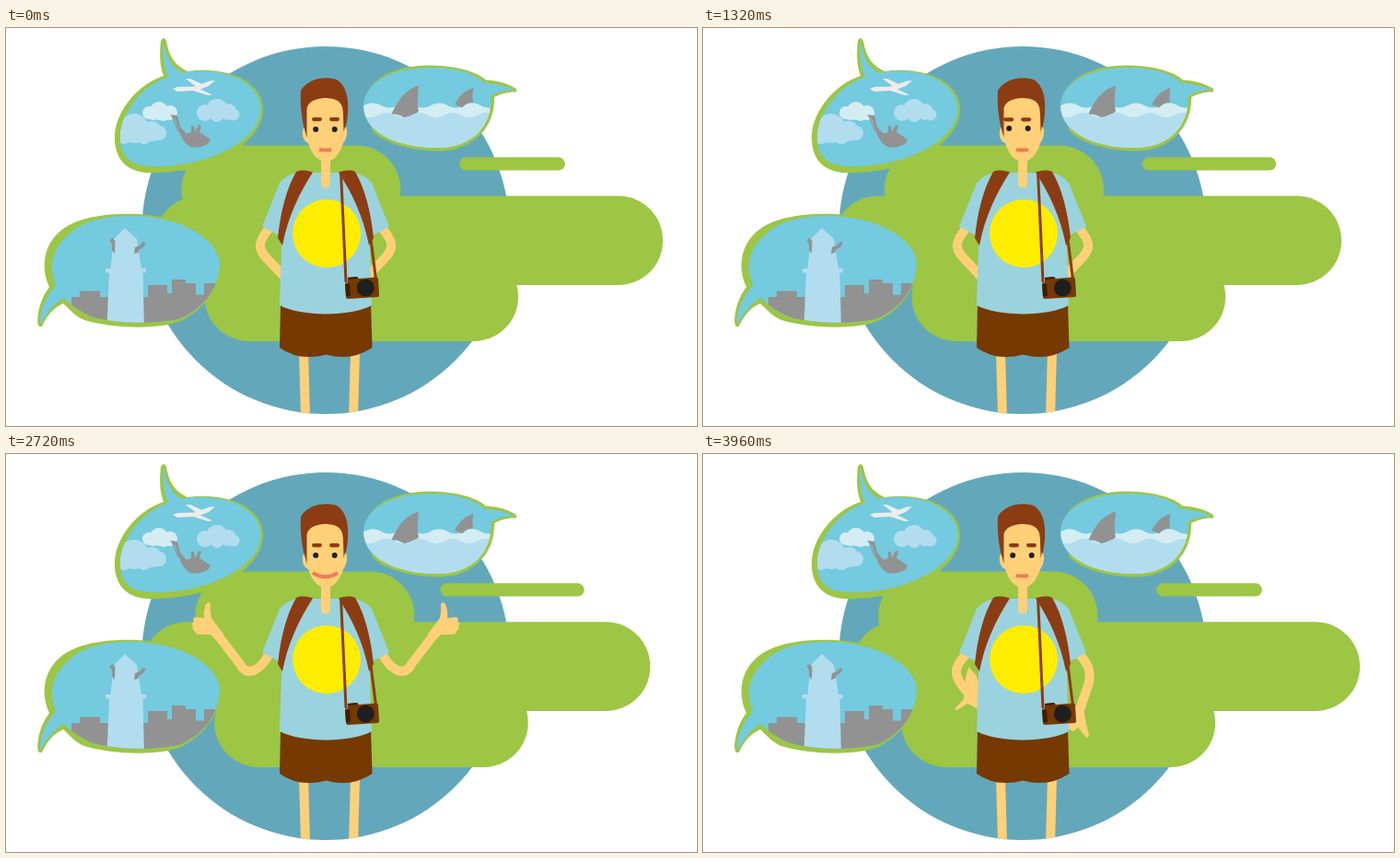
Animation, 750 px wide and 432 px high, one loop 4000 ms. Source, as an HTML page with a canvas:

```html
<!DOCTYPE html>
<html lang="en">
<head>
<meta charset="utf-8">
<title>Traveller</title>
<style>
html, body { margin: 0; width: 100%; height: 100%; overflow: hidden; background: #fff; }
canvas { display: block; width: 750px; height: 432px; }
</style>
</head>
<body>
<canvas id="stage"></canvas>
<script>
const LOOP = 4000, STEP = 40, W = 750, H = 432;
const canvas = document.getElementById('stage');
const ctx = canvas.getContext('2d');
const ratio = window.devicePixelRatio || 1;
canvas.width = W * ratio;
canvas.height = H * ratio;

const C = {
  disc: '#63a8ba', green: '#9cc644', sky: '#74cadf', light: '#b2ddef', pale: '#d3edf3',
  gray: '#929292', plane: '#ececec', skin: '#ffd077', hair: '#8c3c12', shorts: '#763900',
  shirt: '#9ad3de', sun: '#ffed00', dark: '#3e1e08', black: '#1f1f1f', lips: '#ee7b58'
};

const ease = x => (1 - Math.cos(Math.PI * x)) / 2;

// Rises from 0 to 1 at the peak time, then returns by the end of the loop.
const sway = (t, peak) => t < peak ? ease(t / peak) : 1 - ease((t - peak) / (LOOP - peak));

// Eased interpolation between rows of [time, values].
function track(t, rows) {
  let i = 0;
  while (i < rows.length - 2 && t >= rows[i + 1][0]) i++;
  const [t0, a] = rows[i], [t1, b] = rows[i + 1];
  const k = ease(Math.min(1, Math.max(0, (t - t0) / (t1 - t0))));
  return a.map((v, n) => v + (b[n] - v) * k);
}

function fill(shape, color) {
  ctx.fillStyle = color;
  ctx.fill(typeof shape === 'string' ? new Path2D(shape) : shape);
}

function stroke(d, color, width, cap = 'butt') {
  ctx.strokeStyle = color;
  ctx.lineWidth = width;
  ctx.lineCap = cap;
  ctx.lineJoin = 'round';
  ctx.stroke(new Path2D(d));
}

function circle(x, y, r, color) {
  ctx.beginPath();
  ctx.arc(x, y, r, 0, 7);
  ctx.fillStyle = color;
  ctx.fill();
}

function pill(x0, x1, y0, y1, color) {
  ctx.beginPath();
  ctx.roundRect(x0, y0, x1 - x0, y1 - y0, (y1 - y0) / 2);
  ctx.fillStyle = color;
  ctx.fill();
}

function inside(d, draw) {
  ctx.save();
  ctx.clip(new Path2D(d));
  draw();
  ctx.restore();
}

function bubble(rim, body, draw) {
  fill(rim, C.green);
  fill(body, C.sky);
  inside(body, draw);
}

function mirrored(draw) {
  ctx.save();
  ctx.translate(694, 0);
  ctx.scale(-1, 1);
  draw();
  ctx.restore();
}

function backdrop(t) {
  circle(347, 219.5, 199.5, C.disc);
  const a = 15.2 * sway(t, 2880), b = 23 * sway(t, 1720);
  const c = 15 * sway(t, 2000), d = 24.5 * sway(t, 2280);
  pill(190.3 + a, 428.3 + a, 127.5, 223.5, C.green);
  pill(161.5 - b, 713 - b, 182.3, 279, C.green);
  pill(215.5 + c, 556 + c, 243.5, 340, C.green);
  pill(492 - d, 606.8 + d, 140.3, 154.5, C.green);
}

function skydive() {
  const puffs = (list, color) => list.forEach(p => circle(...p, color));
  puffs([[139, 109, 16], [158, 112, 11], [166, 114, 8], [128, 118, 8], [150, 118, 8]], C.light);
  puffs([[166, 90, 10], [155, 92, 7], [178, 92, 8], [160, 94, 6], [171, 95, 6]], C.pale);
  puffs([[229, 88.5, 11.5], [216, 92, 9], [241, 91, 9], [247, 94, 6.5], [229, 95, 7]], C.light);
  fill('M181,66 L186,64 L204,63.5 L221,57.5 L227,57 L220,63 L211,66.5 L224,72.5 L219,73 L203,68 L186,69Z' +
    'M195,55 L200,55 L213,61 L206,63.5Z', C.plane);
  fill('M178,94 L186,95 L189,107 L196,115 L201,113 L201,106 L204,106 L205,113 L209,105 L212,106' +
    ' L210,113 L222,121 L220,125 Q211,131 200,129 Q191,124 187,110 L184,100Z', C.gray);
  stroke('M180,95 L187,112 M183,95 L190,113', C.gray, 1.2);
}

function wave(base, amp, phase, color) {
  const p = new Path2D();
  p.moveTo(385, 140);
  for (let x = 385; x <= 535; x += 2) p.lineTo(x, base + amp * Math.sin((x - phase) / 36 * 2 * Math.PI));
  p.lineTo(535, 140);
  fill(p, color);
}

function sharks() {
  wave(84, 2.6, 407, C.pale);
  fill('M418,94 C425,80 431,68 448,62.5 C447,73 446,82 448,90 Q443,97 432,97 Q424,92 418,94Z', C.gray);
  fill('M487,83 C492,74 497,68 507.5,65 C506,71 506,75 507,81 Q501,80 495,86.5 Q491,84 487,83Z', C.gray);
  wave(94.5, 2.6, 422, C.light);
}

function city() {
  fill('M71,330 V292 H80 V285.5 H102 V292 H154 V279 H175 V288 H180 V273 H195 V277 H206 V289.5 H215 V277 H240 V330Z', C.gray);
  fill('M109.5,325 L112,265.5 H108 V261 H113.5 L117,229 L129,217 L142,229 L147,261 H152 V265.5 H148.5 L150,325Z', C.light);
  fill('M112.5,230 L116,228 L118.5,231 L118,245 L115,241 L115,235Z', C.gray);
  fill('M139,245 L140,238 L145,236 L149,232 L152,233 L149,238 L145,240 L143,244Z', C.gray);
}

function bubbles() {
  bubble(
    'M168,14 Q171,8 174,14 C177,32 184,41 197,47 C240,41 279,58 279,88 C279,118 240,145 205,152' +
    ' C190,155 170,158 152,157 C127,155 117,138 118,116 C120,88 145,60 171,52 C166,38 167,25 168,14Z',
    'M171,14 C174,32 180,43 191,48.5 C237,41 276.5,59 276.5,88 C276,118 236,138 206,145' +
    ' C190,149 170,151 155,150 C133,149 123,137 124,116 C126,90 148,62 176,53 C170,40 170,25 171,14Z',
    skydive);
  bubble(
    'M389,80 C394,55 420,41 460,40.5 C490,41 510,47 521,56.5 C535,57 546,61 554,66 L554,69.5' +
    ' C544,69 536,72 530,75 C531,108 507,133 470,133.5 C440,133 412,126 398,112Z',
    'M388,85 C388,60 418,43 460,43 C490,43 510,50 519,59.5 C532,60 544,64 553,67.5' +
    ' C541,67 532,70 526.5,74 C528,107 505,130 468,130 C428,130 389,115 388,85Z',
    sharks);
  bubble(
    'M36,324 Q33,320 35,310 C37,296 43,287 47,281 C38,262 39,235 62,218 C85,202 125,200 155,203' +
    ' C200,208 233,232 232,258 C231,285 215,305 190,318 C165,328 115,326 85,317 C75,313 69,305 62,299' +
    ' C50,304 43,315 39,324Z',
    'M37,322 C36,305 45,290 54,279 C46,258 49,240 70,222 C90,204 130,202 155,205' +
    ' C200,210 232,234 232,256 C231,285 212,305 190,315 C165,322 120,321 95,314 C80,308 70,300 63,293' +
    ' C50,300 43,312 37,322Z',
    city);
}

// Pose: two curve handles, forearm start, wrist, open-hand anchor, open-hand turn.
const HIPS = [274, 232, 272, 239, 284, 251, 302, 270];
const THUMB = [277, 233, 262, 244, 254, 228, 231, 198];
const ARMS = [
  {
    hips: [...HIPS, 309, 236, -50],
    brush: [274, 230, 271, 238, 281, 251, 290, 262, 289, 232, -32],
    open: [280, 226, 277, 234, 274, 243, 271, 253, 291, 225, 0],
    hand: 'M0,-1 L2,11 L-1,25 L0,39 L-4,37 L-4,41.5 L-8,40 L-10,42.5 L-13,41 L-16,43 L-19,37 L-22,32' +
      ' L-35,32 Q-39,30 -36,29 L-24,26 L-18,20 Q-10,6 0,-1Z'
  },
  {
    hips: [...HIPS, 301, 262, -40],
    brush: [274, 230, 271, 240, 278, 257, 286, 280, 285, 272, -18],
    open: [278, 226, 271, 238, 272, 250, 275, 263, 274, 255, 0],
    hand: 'M-6,4 L-12,16 L-20,29 Q-20,33 -16,31 L-6,24 L-2,30 L3,29 L7,31 L11,27 L14,22 L10,12 L5,3Z'
  }
];
const FIST = 'M5,-3 L-2,-12 L-8,-20 Q-10,-28 -9,-35 Q-11,-39 -14,-35 Q-17,-27 -16,-20 L-26,-21 Q-29,-19 -27,-16' +
  ' Q-31,-14 -28,-11 Q-30,-8 -26,-6 Q-26,-2 -21,-2 L-9,-2 L-3,4Z';

function arm(t, { hips, brush, open, hand }) {
  const thumb = [...THUMB, ...open.slice(8)];
  const p = track(t, [[1960, hips], [2080, brush], [2240, open], [2480, thumb], [3440, thumb],
    [3720, open], [3960, brush], [4000, hips]]);
  const up = t > 2320 && t < 3620;
  if (t >= 2480 && t < 3440) {
    const bob = Math.sin((t - 2720) / 680 * Math.PI / 2);
    p[6] += 1.2 * bob * bob;
    p[7] += 1.2 * bob * bob;
  }
  const [ax, ay, bx, by, jx, jy, wx, wy, hx, hy, turn] = p;
  stroke(`M286,214 L285,218 C${ax},${ay} ${bx},${by} ${jx},${jy} L${wx},${wy}`, C.skin, 10);
  ctx.save();
  if (up) {
    ctx.translate(wx, wy);
    ctx.rotate(Math.atan2(wy - jy, wx - jx) - Math.atan2(-30, -23));
    fill(FIST, C.skin);
  } else {
    ctx.translate(hx, hy);
    ctx.rotate(turn * Math.PI / 180);
    fill(hand, C.skin);
  }
  ctx.restore();
}

const STRAP = 'M315,156 Q322,153 333,156.5 C318,180 306,205 300,236 L295,228 C298,200 304,175 315,156Z';

function body(t) {
  ctx.save();
  ctx.beginPath();
  ctx.arc(347, 219.5, 199.5, 0, 7);
  ctx.clip();
  fill('M318,350 H328 L330,422 H320Z M374,350 H384 L382,422 H372Z', C.skin);
  ctx.restore();
  arm(t, ARMS[0]);
  mirrored(() => arm(t, ARMS[1]));
  fill('M298,299 H396 L397.5,347 Q375,362 347.5,354.5 Q318,362 297,347Z', C.shorts);
  fill('M316,157 Q303,160 297,168 L278,215.5 L299.5,227 Q298,265 297,301 C320,313.5 375,313.5 397,301' +
    ' L394.5,227 L416,215.5 L397,168 Q391,160 378,157Z', C.shirt);
  circle(348, 223, 37, C.sun);
  fill(STRAP, C.hair);
  mirrored(() => fill(STRAP, C.hair));
  stroke('M363.5,156 L369,276 M395,222 L401.5,273', C.hair, 3);
  fill('M368,277 L371,276 L371,271 L381,270 L383,272 L402,270.5 Q404,270.5 404,273 L405,290' +
    ' Q405,292 403,292 L371,294 Q369,294 369,292Z', C.shorts);
  fill('M368,278 L373,277.5 L374,291 L369,291.5Z M371,271 L381,270 L382,272 L371,273Z', C.dark);
  circle(390.3, 282, 9.5, C.black);
}

function head(t) {
  fill('M326,119 C321,100 319,85 320,68 C328,55 345,52 359,56 C370,63 372,78 371,92 C370,104 368,110 366.5,116Z', C.hair);
  fill('M342,138 H352 V168 Q352,173.5 347,173.5 Q342,173.5 342,168Z', C.skin);
  fill('M326.5,119 L326.5,88 C328,78 340,76 348,76 C360,77 366,80 366,94 L366.5,113 L368,107 C372,110 370,120 366,125' +
    ' C362,138 355,145 347,145 C339,145 332,138 328,125 C322,123 320,113 323.5,108Z', C.skin);

  const [ex, ey] = track(t, [[0, [0, 0]], [400, [3, -3]], [960, [-4, -3]], [1320, [-4, -1]],
    [1720, [-4, 0]], [2000, [0, 0]], [LOOP, [0, 0]]]);
  const [bx, by] = track(t, [[0, [0, 0]], [400, [2, -1.5]], [1040, [-6, -3.8]], [1320, [-5.8, 0.2]],
    [1720, [-5, 0]], [2000, [0, 0]], [LOOP, [0, 0]]]);
  for (const x of [0, 20.5]) circle(336.2 + x + ex, 110 + ey, 3, C.black);
  for (const x of [332, 351]) pill(x + bx, x + 11 + bx, 97 + by, 101.2 + by, C.hair);

  const [half, y, dip] = track(t, [[0, [6.5, 132, 1.2]], [1900, [6.5, 132, 1.2]], [2200, [13.5, 128.8, 9]],
    [3400, [13.5, 128.8, 9]], [LOOP, [6.5, 132, 1.2]]]);
  stroke(`M${346.5 - half},${y} Q346.5,${y + dip} ${346.5 + half},${y}`, C.lips, 4);
}

function render() {
  const t = Math.floor(performance.now() % LOOP / STEP) * STEP;
  ctx.setTransform(ratio, 0, 0, ratio, 0, 0);
  ctx.fillStyle = '#fff';
  ctx.fillRect(0, 0, W, H);
  backdrop(t);
  bubbles();
  body(t);
  head(t);
  requestAnimationFrame(render);
}
render();
</script>
</body>
</html>
```
